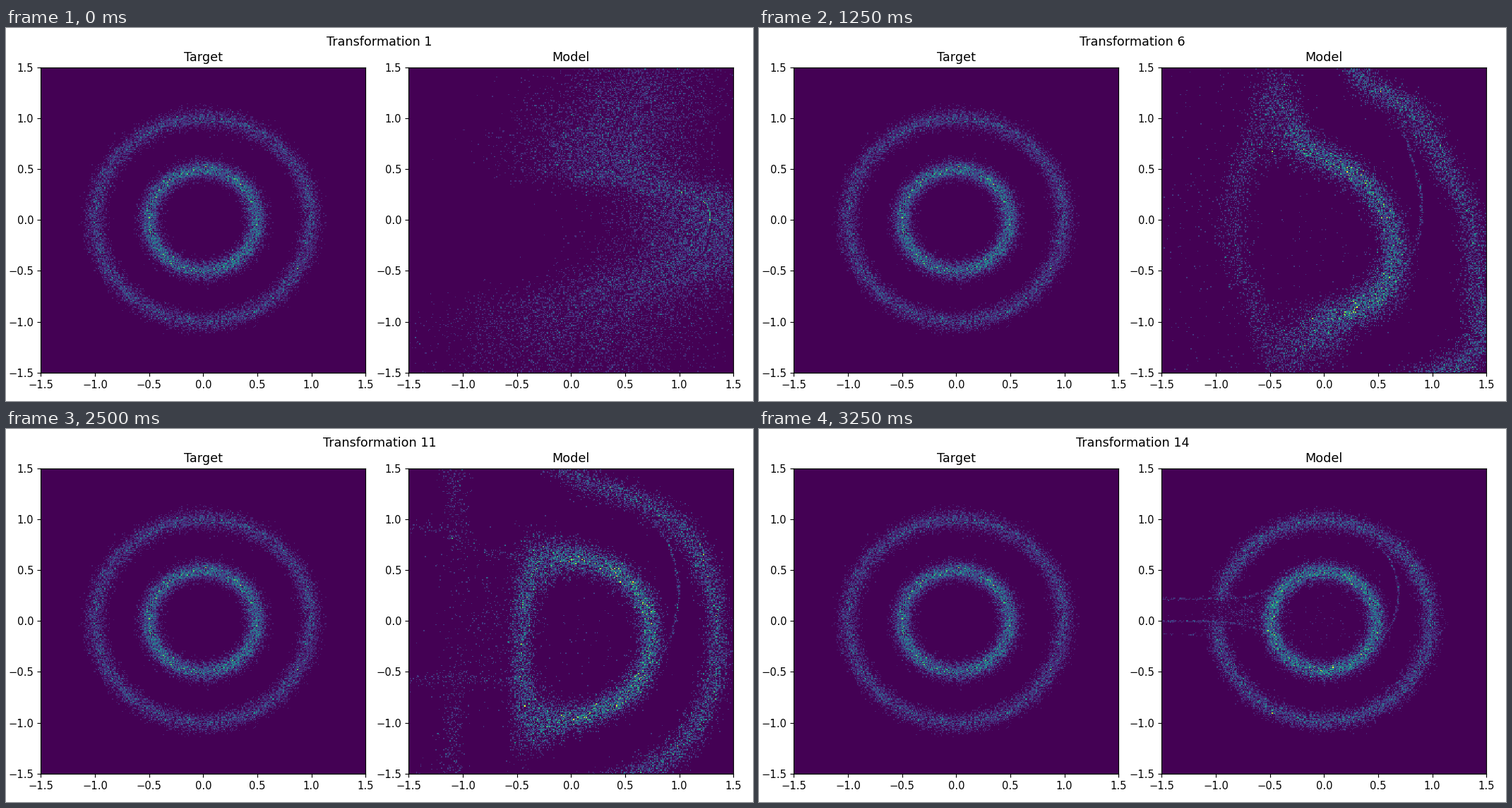
Write a matplotlib script that moves like this. It is 1058 px wide and 529 px high and loops after 3500 ms.

```python
import numpy as np
import matplotlib.pyplot as plt
from matplotlib.animation import FuncAnimation

W, H, STEPS, BINS, LIM = 1058, 529, 14, 300, 1.5
RING_N, LINK_N, STRAY_N = 12500, 200, 350
rng = np.random.default_rng(7)


def ring(radius, lo, hi, noise=.05):
    a = np.radians(rng.uniform(lo, hi, RING_N))
    return radius * np.c_[np.cos(a), np.sin(a)] + rng.normal(0, noise, (RING_N, 2))


def rise(u):
    return .5 + .5 * np.tanh(u / 2)


def bell(u):
    return np.exp(-u * u)


def ranked_normal(key):
    return np.sort(rng.normal(size=key.size))[key.argsort().argsort()]


def links():
    """Thin threads that tie the two rings together."""
    y = rng.uniform(-.27, .75, LINK_N)
    right = np.c_[.69 - .75 * (y - .27) ** 2, y]
    x = rng.uniform(-1.6, -.3, LINK_N)
    upper = np.c_[x, .22 + .17 * rise((x + .52) / .09)]
    x = rng.uniform(-1.6, -.48, LINK_N)
    lower = np.c_[x, -.11 * rise((x + .68) / .1)]
    x = rng.uniform(-1.6, -1, LINK_N // 6)
    short = np.c_[x, np.full_like(x, -.13)]
    points = np.vstack([right, upper, lower, short])
    return points + rng.normal(0, .006, points.shape)


# Scale and shift that undo each coupling layer, last layer first.
# They alternate: y given x, then x given y.
undo = [
    lambda x: (1.42 + 1.2 * rise((-.7 - x) / .2), -.06 - .08 * rise((-.7 - x) / .2)),
    lambda y: (1.23 + .15 * y**2, .14 - .06 * y**2),
    lambda x: (1.04 + 1.7 * rise((-.6 - x) / .2), -.09 - .12 * rise((-.6 - x) / .2)),
    lambda y: (.97 - .15 * y**2 - .04 * y, .05 + .13 * y**2 - .07 * y),
    lambda x: (1.1 + 1.4 * rise((-.4 - x) / .15) + .15 * rise((x - 1) / .2),
               -.12 * rise((x - 1) / .2)),
    lambda y: (1.1, -.13 + .2 * rise((abs(y) - 1.1) / .12)),
    lambda x: (.87 + .8 * rise((-.3 - x) / .12), .02),
    lambda y: (1.05 + .12 * bell(y / .7), -.22 * bell(y / .9)),
    lambda x: (1.1 - .6 * rise((x - 1.05) / .06), .06 + .12 * rise((x - 1.05) / .06)),
    lambda y: (.97, -.04 - .09 * bell((y - .5) / .4)),
]


def bent_gaussian(points):
    """Normal cloud shifted along x by height; keeps the points' angular order."""
    x, y = points.T
    height = ranked_normal(np.arctan2(y, x))
    spread = ranked_normal(np.hypot(x, y))
    low = rise((-.65 - height) / .12)
    centre = (1.3 - .95 * rise((height - .33) / .06) - 1.25 * low
              + .5 * np.maximum(height - .8, 0))
    return centre + spread * (.42 + .2 * low), height


def flow():
    """Point clouds after every layer, from the bent Gaussian to the rings."""
    stray = rng.normal((-.72, .1), (.22, .09), (STRAY_N, 2))
    hole = rng.normal(0, .25, (STRAY_N // 4, 2))
    points = np.vstack([ring(.49, -180, 180), ring(.985, -179, 167), links(), stray, hole])
    x, y = points.T
    clouds = [(x, y)]
    for i, layer in enumerate(undo):
        if i % 2 == 0:
            scale, shift = layer(x)
            y = y * scale + shift
        else:
            scale, shift = layer(np.clip(y, -1.8, 1.8))
            x = x * scale + shift
        clouds.append((x, y))
    x1, y1 = bent_gaussian(points)
    y2 = (y1 + y) / 2
    clouds += [(x, y2), (x1, y2), (x1, y1)]
    return clouds[::-1]


def counts(x, y):
    return np.histogram2d(x, y, bins=BINS, range=[[-LIM, LIM]] * 2)[0].T


def panel(left, title, grid):
    ax = fig.add_axes([left / W, 40.3 / H, 460 / W, 433 / H])
    ax.set_title(title)
    return ax.imshow(grid, origin="lower", extent=[-LIM, LIM] * 2, aspect="auto",
                     cmap="viridis", interpolation="nearest")


fig = plt.figure(figsize=(10, 5), dpi=105.8)
heading = fig.suptitle("")
grids = [counts(x, y) for x, y in flow()]
circles = np.vstack([ring(1, 0, 360), ring(.5, 0, 360)])
panel(49.3, "Target", counts(*circles.T))
model = panel(570.3, "Model", grids[0])


def draw(i):
    heading.set_text(f"Transformation {i + 1}")
    model.set_data(grids[i])
    model.set_clim(0, grids[i].max())
    return model, heading


anim = FuncAnimation(fig, draw, frames=STEPS, interval=250, repeat=True)
plt.show()
```
